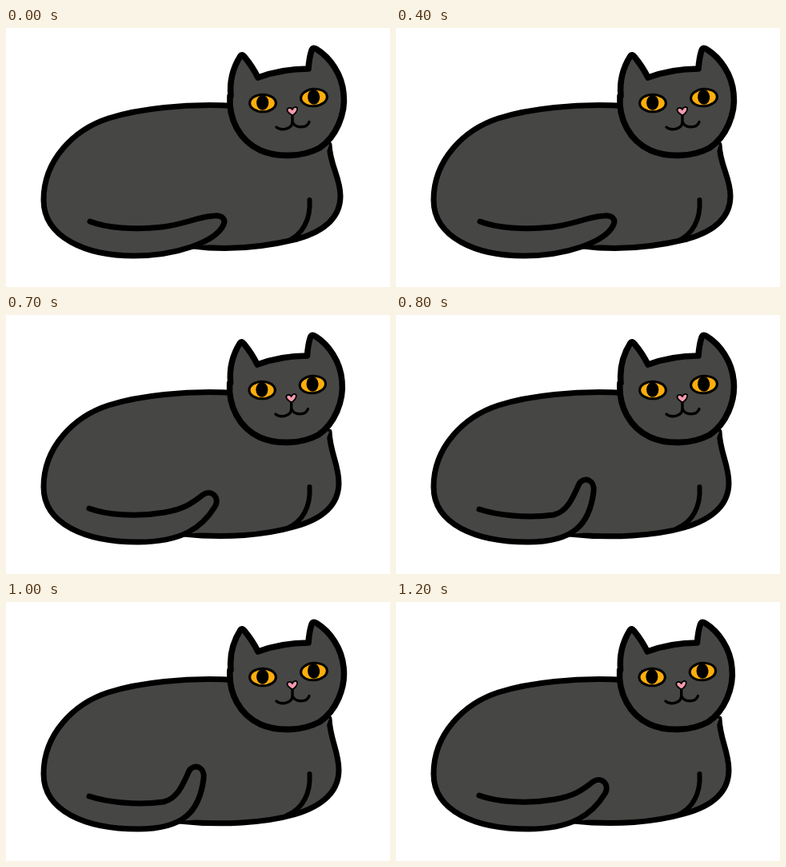
Write an HTML page that moves like this. It is 480 px wide and 324 px high and loops after 1.3 s.

```html
<!DOCTYPE html>
<html lang="en">
<head>
<meta charset="utf-8">
<title>Resting cat</title>
<style>
  html, body { margin: 0; width: 100%; height: 100%; overflow: hidden; background: #fff; }
  svg { display: block; width: 480px; height: 324px; }
  .fur { fill: #464744; stroke: #000; stroke-width: 7; stroke-linecap: round; stroke-linejoin: round; }
  .line { fill: none; stroke: #000; stroke-linecap: round; stroke-linejoin: round; }
  .pose { visibility: hidden; animation: 1.3s step-end infinite; }
  .low { animation-name: low; }
  .mid { animation-name: mid; }
  .high { animation-name: high; }
  @keyframes low { 0% { visibility: visible; } 46.15%, 100% { visibility: hidden; } }
  @keyframes mid {
    0%, 61.535% { visibility: hidden; }
    46.15%, 84.61% { visibility: visible; }
    100% { visibility: visible; }
  }
  @keyframes high { 0%, 84.61%, 100% { visibility: hidden; } 61.535% { visibility: visible; } }
</style>
</head>
<body>
<svg viewBox="0 0 480 324">
  <defs>
    <g id="eye">
      <ellipse rx="18" ry="12.3"/>
      <ellipse rx="14.8" ry="9.2" fill="#ffae0c"/>
      <ellipse cx="-.3" cy="-.6" rx="7.6" ry="9.4"/>
    </g>
    <g id="head">
      <path class="fur" style="stroke-width:7.6" d="M281 85 C279 63 286 46 293 35 Q295 32 298 36 Q308 48 315 62
        Q345 51 378 51 Q379 37 382 28 Q384 23 389 27 C405 37 420 58 422 82
        C425 108 412 137 392 150 C370 162 338 162 318 153 C292 141 278 114 280 85 Z"/>
      <use href="#eye" transform="translate(321 94)"/>
      <use href="#eye" transform="translate(385 87) rotate(-5)"/>
      <path d="M358 109.500 C354 107 350 104 352 101 C354 99 357 100 358 102 C359 99 362 98 364 100 C365 103 362 107 358 109.500 Z"
        fill="#f49bad" stroke="#000" stroke-width="1.800" stroke-linejoin="round"/>
      <path class="line" stroke-width="3.400" d="M358 110 V117 C358 127 344 129 338 124 M358 117 C361 126 376 126 379 117.500"/>
    </g>
    <path id="leg" class="line" stroke-width="6" d="M379.500 215 C381 239 371 259 351 267"/>
  </defs>

  <g class="pose low">
    <path class="fur" d="M234 273 C280 279 327 273 364 264 C399 254 418 237 418 210 C418 187 405 172 404 146" />
    <path fill="#464744" d="M234 273 L364 262 L404 146 L286 99 L90 200 L105 243 Z"/>
    <use href="#leg"/>
    <path class="fur" d="M286 97.500 C225 94 165 101 128 113 C85 127 47 165 47 215
      C47 262 100 285 160 285 C212 285 262 268 272 246 C275 239 270 234 260 235
      C240 236 222 246 195 249 C160 253 125 250 105 242"/>
    <use href="#head"/>
  </g>

  <g class="pose mid">
    <path class="fur" d="M222 274 C275 280 325 275 360 265 C397 255 416 237 416 210 C416 187 405 172 404 146"/>
    <path fill="#464744" d="M222 274 L360 263 L404 146 L286 99 L90 200 L105 243 Z"/>
    <use href="#leg"/>
    <path class="fur" d="M286 97.500 C225 94 165 101 128 113 C85 127 47 165 47 215
      C47 262 100 284 165 284 C220 284 245 266 261 240 C268 229 257 217 246 225
      C232 236 222 243 198 247 C163 253 125 250 104 242"/>
    <use href="#head" transform="translate(3 0) scale(.988 1)"/>
  </g>

  <g class="pose high">
    <path class="fur" d="M216 274 C270 280 325 276 360 266 C397 255 416 237 416 210 C416 187 405 172 404 146"/>
    <path fill="#464744" d="M216 274 L360 264 L404 146 L286 99 L90 200 L105 243 Z"/>
    <use href="#leg"/>
    <path class="fur" d="M286 97.500 C225 94 165 101 128 113 C85 127 47 165 47 215
      C47 262 100 284 165 284 C222 284 242 262 247 221 C249 207 236 201 229 211
      C222 226 215 246 197 250 C163 255 125 250 104 243"/>
    <use href="#head"/>
  </g>
</svg>
</body>
</html>
```
